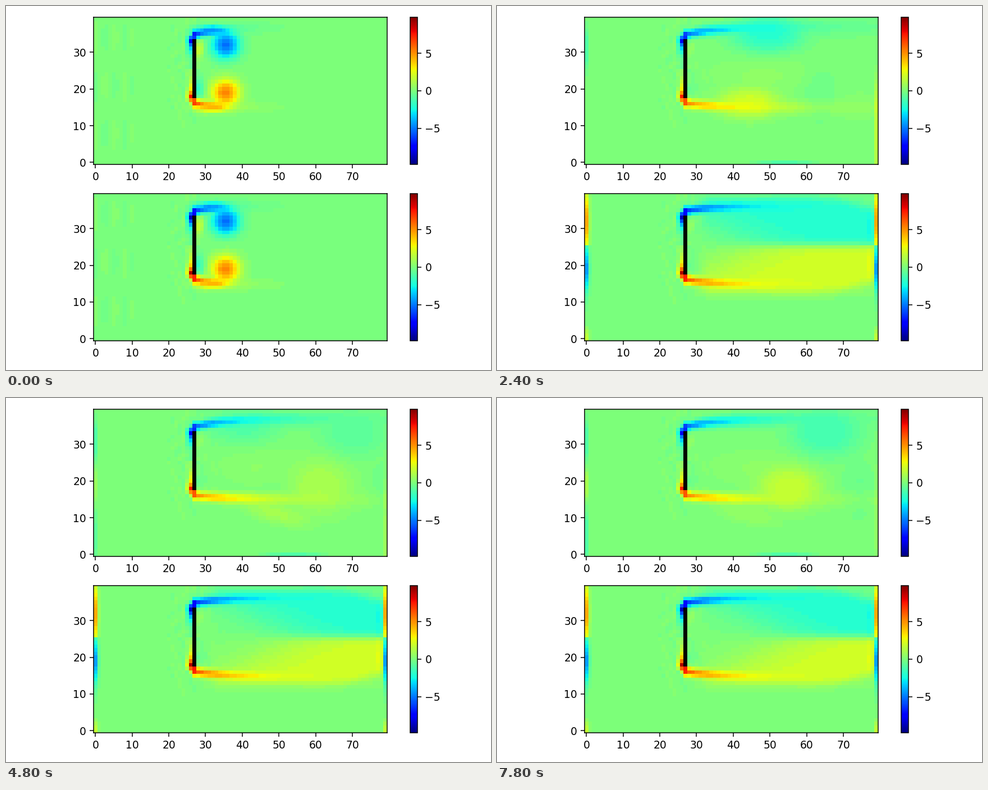
Write a matplotlib script that moves like this. It is 864 px wide and 648 px high and loops after 8 s.

```python
import numpy as np
import matplotlib.pyplot as plt
from matplotlib.animation import FuncAnimation

COLS, ROWS = 80, 40
MID = 25.5          # row of the plate's centre
FRAMES, STEP = 40, 200

R, C = np.mgrid[0:ROWS, 0:COLS].astype(float)
D = R - MID
PLATE = (C == 27) & (np.abs(D) < 8)


def ramp(a, b, x):
    u = np.clip((x - a) / (b - a), 0, 1)
    return u * u * (3 - 2 * u)


def sig(x):
    return 1 / (1 + np.exp(-np.clip(x, -40, 40)))


def blob(x, y, a, b, p=1.0, slope=0.0):
    q = ((C - x) / a) ** 2 + ((R - y - slope * (C - x)) / b) ** 2
    return np.exp(-np.minimum(q, 50) ** p)


def merge(parts):
    """Smooth maximum of non-negative fields."""
    return np.cbrt(sum(p ** 3 for p in parts))


def tip(flip, scale):
    """Strong vorticity around one end of the plate."""
    d = flip * D
    edge = np.exp(-np.abs(d - 7.5) / 2.3) * (d > 0) * (d < 9)
    edge *= 1.0 * (C == 26) + 0.28 * (C == 25)
    return 9 * scale * merge([edge, blob(27, MID + flip * 8.9, 0.9, 0.9)])


def shear(flip, t, amp, rise):
    """Thin layer leaving the tip, lengthening in the first second."""
    x = np.maximum(C - 28, 0)
    centre = 9.5 + rise * (1 - np.exp(-x / 9))
    across = np.exp(-((flip * D - centre) / (1.15 + 0.03 * x)) ** 2)
    length = 6 + 14 * ramp(0, 1, t)
    return amp * np.exp(-x / length) * across * (C > 26)


def first_vortex(flip, t, decay):
    """Starting vortex: curls up, then drifts off and spreads."""
    g = ramp(0, 1, t)
    amp = 5.2 * np.exp(-decay * t) * ramp(2.4, 1.3, t)
    core = blob(35.5 + 13 * t, MID + flip * (6.5 + 0.3 * g),
                3.9 + 9.6 * g, 3.7 + 2.5 * g, 1.1 + 0.3 * g)
    arc = blob(32, MID + flip * 10.4, 5, 1.5, 1.3)
    return merge([amp * core, 4 * ramp(0.9, 0, t) * arc])


def near_plate(t):
    """Counter-signed skin behind the plate and the faint ripple around it."""
    amp = 0.4 + 1.4 * ramp(1, 0, t)
    skin = blob(28.3, 31, 1.3, 2.8) - blob(28.3, 20, 1.3, 2.8)
    ripple = np.sin(1.9 * C + 2.4 * np.abs(D)) * np.sin(2.7 * D - 0.8 * C)
    ripple *= 0.35 * np.exp(-((C - 25) / 6) ** 2 - (D / 17) ** 4)
    streaks = np.cos(1.2 * C) * np.cos(0.24 * (R - 34)) * ramp(13, 9, C)
    return amp * skin + ripple + 0.22 * streaks * ramp(0.7, 0, t)


def finish(f):
    return np.ma.array(np.round(f / 0.25) * 0.25, mask=PLATE)


def top_edges(f, t):
    r = np.arange(ROWS)
    on, late = ramp(1.4, 2.4, t), ramp(3, 6, t)

    def bump(y, s):
        return np.exp(-((r - y) / s) ** 4)

    f[:, 0] += on * (late * (bump(19, 4) - bump(5, 7)) - bump(31, 6))
    f[:, 79] += on * (1.4 - late) * bump(9, 14)
    f[0] -= 0.9 * on * np.exp(-((C[0] - 54) / 8) ** 4)


def top_field(t):
    amp = 5 + ramp(1, 0, t)
    pos = [tip(-1, 0.85), shear(-1, t, amp, 1.0), first_vortex(-1, t, 0.8)]
    neg = [tip(1, 0.88), shear(1, t, amp, 1.9), first_vortex(1, t, 0.8)]
    patch = ramp(0.4, 1, t) * ramp(1.8, 1, t)
    pos.append(1.2 * patch * blob(39, 27, 4, 2.5, 1.3, -0.5))

    # vortices shed one after another and carried downstream
    shed, grow = ramp(1, 2.2, t), 0.1 + 0.9 * ramp(3, 6, t)
    lead = 5 + 5 * ramp(2.4, 5.6, t)
    s = t - 5.6
    head = 106 + 18.4 * s - 0.27 * s * s
    for x in head - 30 * np.arange(-1, 6):
        if not 20 < x < 100:
            continue
        far = 1 + (grow - 1) * ramp(48, 62, x)
        amp = 2.1 * shed * far * ramp(32, 45, x)
        amp *= 1 - 0.014 * max(x - 45, 0)
        a = 9 - 4 * ramp(70, 78, x)
        b = 2.2 + 2.2 * ramp(34, 46, x) + 4 * ramp(46, 66, x)
        b += 5 * ramp(69, 78, x)
        y = 15.8 + 2.6 * ramp(40, 58, x)
        pos.append(amp * blob(x, y, a, b, 1.4))
        tail = 1.5 * shed * grow * ramp(50, 62, x) * ramp(78, 70, x)
        pos.append(tail * blob(x - 12, 11.5, 9, 3, 1.4, -0.25))
        gap = 0.4 * shed * ramp(58, 66, x)
        neg.append(gap * blob(x - 11, 18, 5, 8, 1.4))

        x += lead
        far = 1 + (grow - 1) * ramp(58, 70, x)
        amp = 2.1 * shed * far * ramp(34, 47, x)
        amp *= max(1 - 0.019 * max(x - 47, 0), 0)
        edge = ramp(68, 78, x)
        y = 35.2 - 2 * ramp(47, 62, x) - 2 * edge
        b = 4.8 + 2 * ramp(46, 60, x) - 3 * edge
        neg.append(amp * blob(x, y, 10 - 5 * edge, b, 1.4))

    pos.append(0.4 * shed * blob(48, 23.5, 14, 5, 1.5))
    f = merge(pos) - merge(neg) + near_plate(t)
    top_edges(f, t)
    return finish(f)


def wake_half(t, flip):
    """One half of the mirrored wake, as a positive field."""
    d = flip * D
    start = 47 + 11 * ramp(1.5, 5.6, t) - 2.2 * d
    front = 20 + 6 * t + 12 * t * t
    rim = 12.9 - 0.012 * np.maximum(C - 62, 0) ** 2
    wake = 2.1 * sig((C - start) / 7) * sig((rim - d) / 0.7)
    wake *= sig((front - C) / 4) * ramp(28, 34, C) * (1 + 0.15 * (C == 77))
    parts = [wake, first_vortex(flip, t, 0.7)]
    inner = np.tanh(np.maximum(d, 0) / 1.1)
    return merge([p * inner for p in parts]
                 + [tip(flip, 1), shear(flip, t, 6, 1.3)])


def bottom_field(t):
    f = wake_half(t, -1) - wake_half(t, 1) + near_plate(t)
    r = np.arange(ROWS)
    edge = np.where(r > MID, 4.5 * np.exp(-((r - 32) / 8) ** 2),
                    -4.3 * np.exp(-((r - 19) / 6) ** 2))
    edge += 1.7 * np.exp(-(r / 2.5) ** 2)
    on = ramp(1.3, 2.3, t)
    f[:, 0] += on * edge
    f[:, 1] += 0.15 * on * edge
    f[:, 79] += on * (edge - f[:, 79])
    return finish(f)


def panel(ax):
    im = ax.imshow(np.zeros((ROWS, COLS)), cmap=cmap, origin="lower",
                   interpolation="nearest", vmin=-9.8, vmax=9.8)
    ax.set_xticks(range(0, COLS, 10))
    ax.set_yticks(range(0, ROWS, 10))
    fig.colorbar(im, ax=ax, ticks=[-5, 0, 5])
    return im


cmap = plt.get_cmap("jet").copy()
cmap.set_bad("black")
fig, axes = plt.subplots(2, 1, figsize=(6.4, 4.8), dpi=135, facecolor="white")
upper, lower = map(panel, axes)
fig.tight_layout()


def update(i):
    t = i * STEP / 1000
    lim = 9.8 - 0.37 * np.exp(-((t - 1) / 0.6) ** 2)
    for im, field in ((upper, top_field), (lower, bottom_field)):
        im.set_data(field(t))
        im.set_clim(-lim, lim)
    return upper, lower


anim = FuncAnimation(fig, update, frames=FRAMES, interval=STEP, repeat=True)
plt.show()
```
